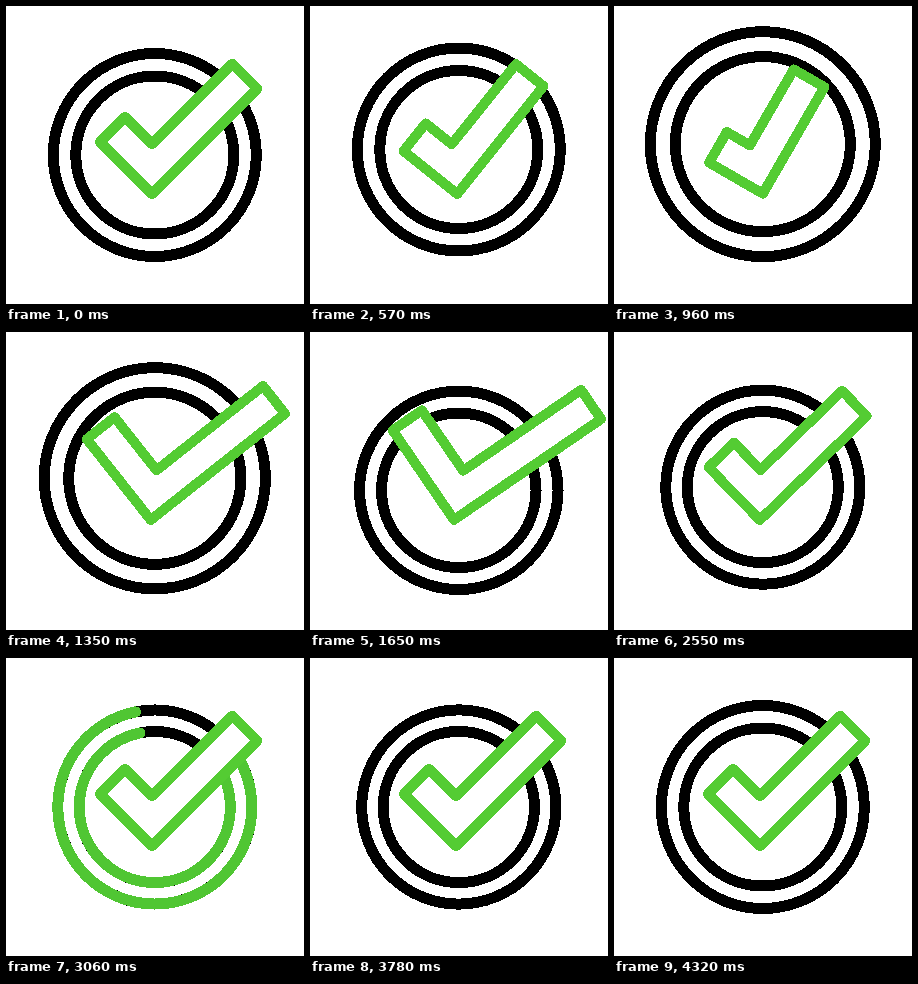
An HTML page for the animation above (4560 ms loop, 298x298 px).

```html
<!DOCTYPE html>
<html lang="en">
<head>
<meta charset="utf-8">
<title>Check mark</title>
<style>
  html, body { margin: 0; height: 100%; overflow: hidden; background: #fff; }
  svg { display: block; width: 100%; height: 100%; shape-rendering: crispEdges; }
  circle { fill: none; stroke: #000; stroke-width: 11; }
  .sweep { stroke: #50c633; stroke-linecap: round; }
  #check { fill: #fff; stroke: #54cc33; stroke-width: 10; stroke-linejoin: round; }
</style>
</head>
<body>
<svg viewBox="0 0 298 298">
  <g id="rings">
    <circle class="outer"/>
    <circle class="inner"/>
    <circle class="outer sweep" pathLength="1" transform="rotate(-45)"/>
    <circle class="inner sweep" pathLength="1" transform="rotate(-45)"/>
  </g>
  <polygon id="check"/>
</svg>
<script>
const LOOP = 4560, STEP = 30;
const rings = document.getElementById('rings');
const check = document.getElementById('check');

const ease = p => p < 0.5 ? 2 * p * p : 1 - 2 * (1 - p) ** 2;

// Eased 0 to 1 between two times.
const ramp = (t, from, to) => ease(Math.min(1, Math.max(0, (t - from) / (to - from))));

// Rises from a to b, holds, falls from c to d.
const pulse = (t, a, b, c, d) => ramp(t, a, b) - ramp(t, c, d);

function drawRings(t) {
  const lift = pulse(t, 240, 900, 900, 2040);
  const drop = pulse(t, 900, 2040, 2040, 2960);
  const grow = pulse(t, 570, 1110, 1110, 1830);
  const shrink = pulse(t, 1110, 1830, 3720, 4320);
  const scale = 1 + 0.128 * grow - 0.044 * shrink;
  const head = ramp(t, 2700, 3200), tail = ramp(t, 3210, 3700);

  rings.setAttribute('transform', `translate(148.8 ${149 - 11 * lift + 15.5 * drop})`);
  for (const ring of rings.children) {
    ring.setAttribute('r', scale * (ring.classList.contains('outer') ? 101.5 : 79));
    if (!ring.classList.contains('sweep')) continue;
    ring.style.display = head > tail ? '' : 'none';
    ring.setAttribute('stroke-dasharray', `${head - tail} 2`);
    ring.setAttribute('stroke-dashoffset', -tail);
  }
}

function drawCheck(t) {
  const squash = pulse(t, 240, 960, 960, 1500);
  const stretch = pulse(t, 960, 1500, 1530, 2250);
  const lean = pulse(t, 960, 1500, 2040, 2676);

  // Diagonal reach of the two arms from the bottom corner.
  const x = 146, y = 188, w = 25;
  const long = (149 - 26 * squash + 31 * stretch) * Math.SQRT1_2;
  const short = (73.5 - 11.5 * squash + 37 * stretch) * Math.SQRT1_2;

  check.setAttribute('points', [
    [x, y], [x + long, y - long], [x + long - w, y - long - w],
    [x, y - 2 * w], [x - short + w, y - short - w], [x - short, y - short]
  ].join(' '));
  check.setAttribute('transform', `rotate(${10.6 * lean - 15 * squash} 146 177)`);
}

const start = performance.now();
function tick() {
  const now = (performance.now() - start) % LOOP;
  const t = now - now % STEP;
  drawRings(t);
  drawCheck(t);
  requestAnimationFrame(tick);
}
tick();
</script>
</body>
</html>
```
